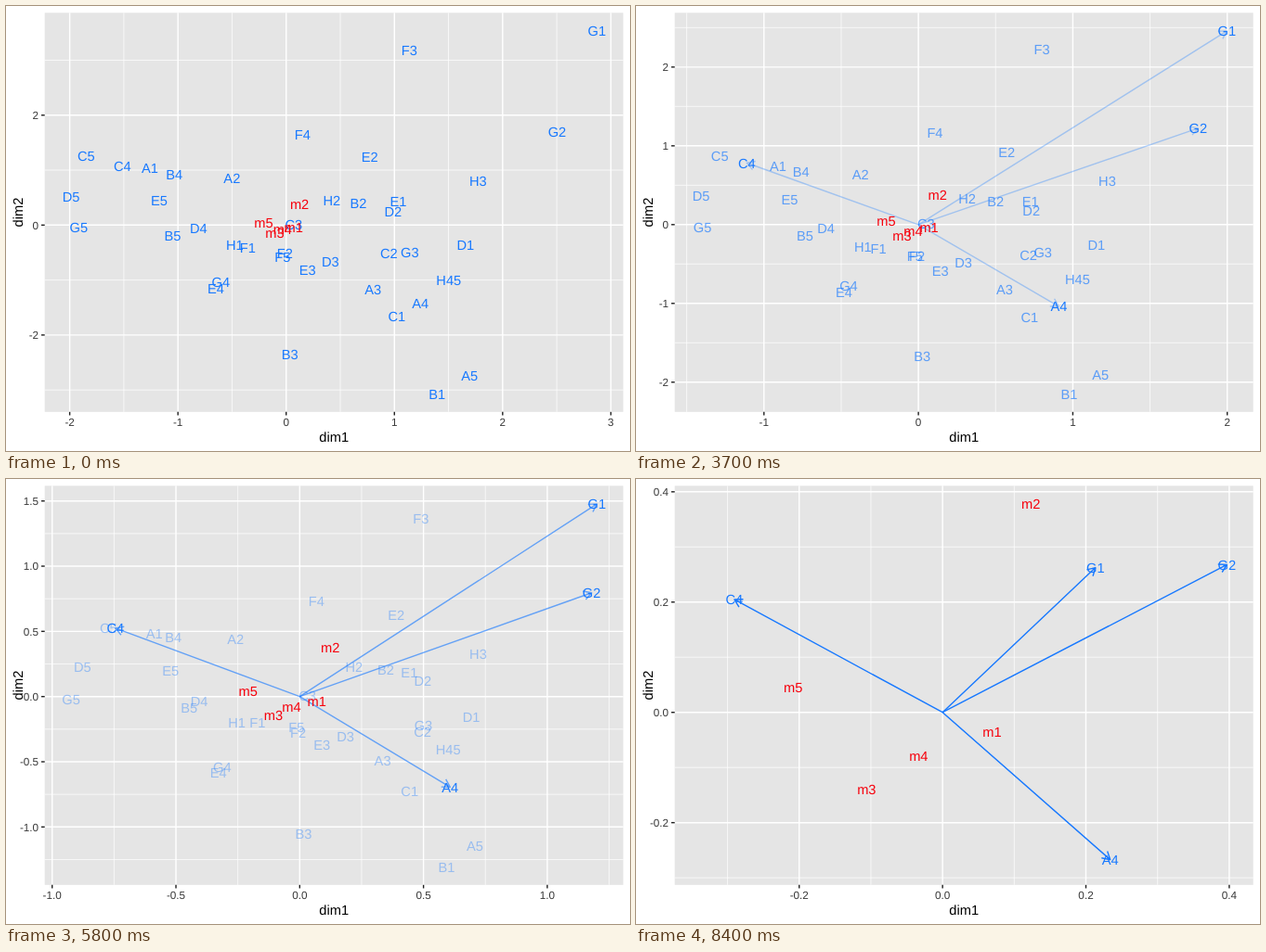
These frames come from a looping animation (672x480 px, 10000 ms). An HTML page:

```html
<!DOCTYPE html>
<html lang="en">
<head>
<meta charset="utf-8">
<title>Biplot</title>
<style>
  html, body { margin: 0; width: 100%; height: 100%; overflow: hidden; background: #fff; }
  svg { display: block; width: 672px; height: 480px; }
  text { font-family: "Liberation Sans", Arial, Helvetica, sans-serif; font-size: 14.66px;
         text-anchor: middle; text-rendering: geometricPrecision; }
  .tick text { font-size: 11.73px; fill: #383838; }
  .tick path { stroke: #222; stroke-width: 1.42; }
  .grid { stroke: #fff; fill: none; }
  .arrow { stroke: #1879ff; stroke-width: 1.42; fill: none; stroke-linejoin: round; }
  .row { fill: #1879ff; }
  .col { fill: #f6000c; }
</style>
</head>
<body>
<svg viewBox="0 0 672 480" xmlns="http://www.w3.org/2000/svg">
  <rect width="672" height="480" fill="#fff"/>
  <rect x="41.7" y="7.33" width="622.97" height="430.5" fill="#e5e5e5"/>
  <g id="axes"></g>
  <g id="arrows"></g>
  <g id="labels"></g>
  <text x="353.2" y="469.7">dim1</text>
  <text transform="translate(17.9 222.6) rotate(-90)">dim2</text>
</svg>
<script>
const PANEL = { left: 41.7, right: 664.67, top: 7.33, bottom: 437.83 };
const STEPS = 70, STEP_MS = 100, HOLD = 1500, LOOP = 10000;
const ARROWED = ['G1', 'G2', 'C4', 'A4'];
const HEAD = 9.6;

// name, x, y, final shrink factor towards the origin
const rows = `A1 -1.26 1.033 .151|A2 -.501 .847 .2327|A3 .803 -1.178 .0725|A4 1.24 -1.416 .1887
A5 1.695 -2.747 .0733|B1 1.395 -3.069 .0857|B2 .666 .391 .2394|B3 .035 -2.359 .1187
B4 -1.033 .914 .195|B5 -1.05 -.199 .0864|C1 1.022 -1.667 .1004|C2 .949 -.52 .2408
C3 .069 .018 .12|C4 -1.513 1.066 .192|C5 -1.848 1.252 .0745|D1 1.657 -.368 .0745
D2 .988 .24 .209|D3 .408 -.672 .1304|D4 -.81 -.066 .207|D5 -1.988 .51 .1115
E1 1.035 .425 .0896|E2 .773 1.235 .2105|E3 .198 -.823 .1297|E4 -.651 -1.161 .2112
E5 -1.174 .442 .1162|F1 -.355 -.418 .175|F2 -.012 -.52 .2674|F3 1.138 3.175 .094
F4 .151 1.64 .1208|F5 -.033 -.587 .038|G1 2.871 3.533 .0743|G2 2.503 1.69 .1585
G3 1.142 -.503 .1048|G4 -.604 -1.043 .2334|G5 -1.917 -.047 .1758|H1 -.475 -.368 .2596
H2 .421 .442 .238|H3 1.772 .796 .0563|H45 1.502 -1.009 .0443`;
const cols = 'm1 .069 -.0355 1|m2 .1233 .378 1|m3 -.106 -.1397 1|m4 -.0334 -.0792 1|m5 -.2084 .0452 1';

const $ = id => document.getElementById(id);

function add(parent, tag, cls, text = '') {
  const el = document.createElementNS('http://www.w3.org/2000/svg', tag);
  el.setAttribute('class', cls);
  el.textContent = text;
  return parent.appendChild(el);
}

function parse(list, cls) {
  return list.split(/[|\n]/).map(item => {
    const [name, ...nums] = item.split(' ');
    const [x, y, shrink] = nums.map(Number);
    const arrow = ARROWED.includes(name) && add($('arrows'), 'path', 'arrow');
    return { x, y, shrink, arrow, fades: cls === 'row' && !arrow,
             label: add($('labels'), 'text', cls, name) };
  });
}

const points = [...parse(rows, 'row'), ...parse(cols, 'col')];

// Extended Wilkinson tick search
function findBreaks(lo, hi, m = 5) {
  const Q = [1, 5, 2, 2.5, 4, 3], range = hi - lo, eps = 1e-10;
  const total = (s, c, d) => .25 * s + .2 * c + .5 * d + .05;
  let best = { score: -2 };
  for (let j = 1; j < 50; j++) {
    for (let i = 0; i < Q.length; i++) {
      const q = Q[i], simple = 2 - i / (Q.length - 1) - j;
      if (total(simple, 1, 1) < best.score) return best;
      for (let k = 2; k < 50; k++) {
        const dMax = k >= m ? 2 - (k - 1) / (m - 1) : 1;
        if (total(simple, 1, dMax) < best.score) break;
        for (let z = Math.ceil(Math.log10(range / (k + 1) / j / q)); z < 9; z++) {
          const step = j * q * 10 ** z, span = step * (k - 1);
          const cMax = span > range ? 1 - ((span - range) / 2) ** 2 / (.1 * range) ** 2 : 1;
          if (total(simple, cMax, dMax) < best.score) break;
          const last = Math.ceil(lo / step) * j;
          for (let s = Math.floor(hi / step) * j - (k - 1) * j; s <= last; s++) {
            const a = s * step / j, b = a + span;
            const off = Math.abs(a / step - Math.round(a / step)) * step;
            const zero = off < eps && a <= eps && b >= -eps ? 1 : 0;
            const cover = 1 - .5 * ((hi - b) ** 2 + (lo - a) ** 2) / (.1 * range) ** 2;
            const r = (k - 1) / span, rt = (m - 1) / (Math.max(b, hi) - Math.min(a, lo));
            const score = total(simple - 1 + zero, cover, 2 - Math.max(r / rt, rt / r));
            if (score > best.score) best = { score, start: a, step, count: k };
          }
        }
      }
    }
  }
  return best;
}

// Scale from data values to pixels, with 5% expansion on both sides
function makeScale(values, from, to) {
  const min = Math.min(...values), max = Math.max(...values);
  const pad = .05 * (max - min), lo = min - pad, hi = max + pad;
  const px = v => from + (v - lo) / (hi - lo) * (to - from);
  const { start, step, count } = findBreaks(lo, hi);
  const inside = v => v >= lo && v <= hi;
  const at = i => start + i * step;
  const major = Array.from({ length: count }, (_, i) => at(i)).filter(inside);
  const minor = Array.from({ length: count + 1 }, (_, i) => at(i - .5)).filter(inside);
  let digits = 0;
  while (digits < 4 && major.some(v => Math.abs(v - +v.toFixed(digits)) > 1e-8)) digits++;
  const name = v => (Math.abs(v) < 1e-9 ? 0 : v).toFixed(digits);
  return { px, major, minor, name };
}

function drawAxes(sx, sy) {
  const { left, right, top, bottom } = PANEL;
  const vLine = v => `M${sx.px(v)} ${top}V${bottom}`;
  const hLine = v => `M${left} ${sy.px(v)}H${right}`;
  const grid = (key, width) => `<path class="grid" stroke-width="${width}" d="${
    sx[key].map(vLine).join('')}${sy[key].map(hLine).join('')}"/>`;
  const xTicks = sx.major.map(v => `<path d="M${sx.px(v)} ${bottom}v3.67"/>
    <text x="${sx.px(v)}" y="452.9">${sx.name(v)}</text>`);
  const yTicks = sy.major.map(v => `<path d="M${left} ${sy.px(v)}h-3.67"/>
    <text x="35.1" y="${sy.px(v) + 4.2}" style="text-anchor:end">${sy.name(v)}</text>`);
  $('axes').innerHTML = grid('minor', .71) + grid('major', 1.42) +
    `<g class="tick">${xTicks.join('')}${yTicks.join('')}</g>`;
}

function arrowPath(x0, y0, x1, y1) {
  const back = Math.atan2(y0 - y1, x0 - x1);
  const barb = turn => `${x1 + HEAD * Math.cos(back + turn)} ${y1 + HEAD * Math.sin(back + turn)}`;
  return `M${x0} ${y0}L${x1} ${y1}M${barb(Math.PI / 6)}L${x1} ${y1}L${barb(-Math.PI / 6)}`;
}

function draw(q) {
  const pos = points.map(p => {
    const f = 1 - q * (1 - p.shrink);
    return [p.x * f, p.y * f];
  });
  const sx = makeScale(pos.map(p => p[0]), PANEL.left, PANEL.right);
  const sy = makeScale(pos.map(p => p[1]), PANEL.bottom, PANEL.top);
  drawAxes(sx, sy);
  points.forEach((p, i) => {
    const x = sx.px(pos[i][0]), y = sy.px(pos[i][1]);
    p.label.setAttribute('x', x);
    p.label.setAttribute('y', y + 5.25);
    if (p.fades) p.label.setAttribute('fill-opacity', 1 - q);
    if (p.arrow) {
      p.arrow.setAttribute('d', arrowPath(sx.px(0), sy.px(0), x, y));
      p.arrow.setAttribute('stroke-opacity', q);
    }
  });
}

let shown = -1;
function tick() {
  const t = performance.now() % LOOP;
  const k = t < HOLD ? 0 : Math.min(STEPS, Math.floor((t - HOLD) / STEP_MS) + 1);
  if (k !== shown) draw((shown = k) / STEPS);
  requestAnimationFrame(tick);
}
tick();
</script>
</body>
</html>
```
